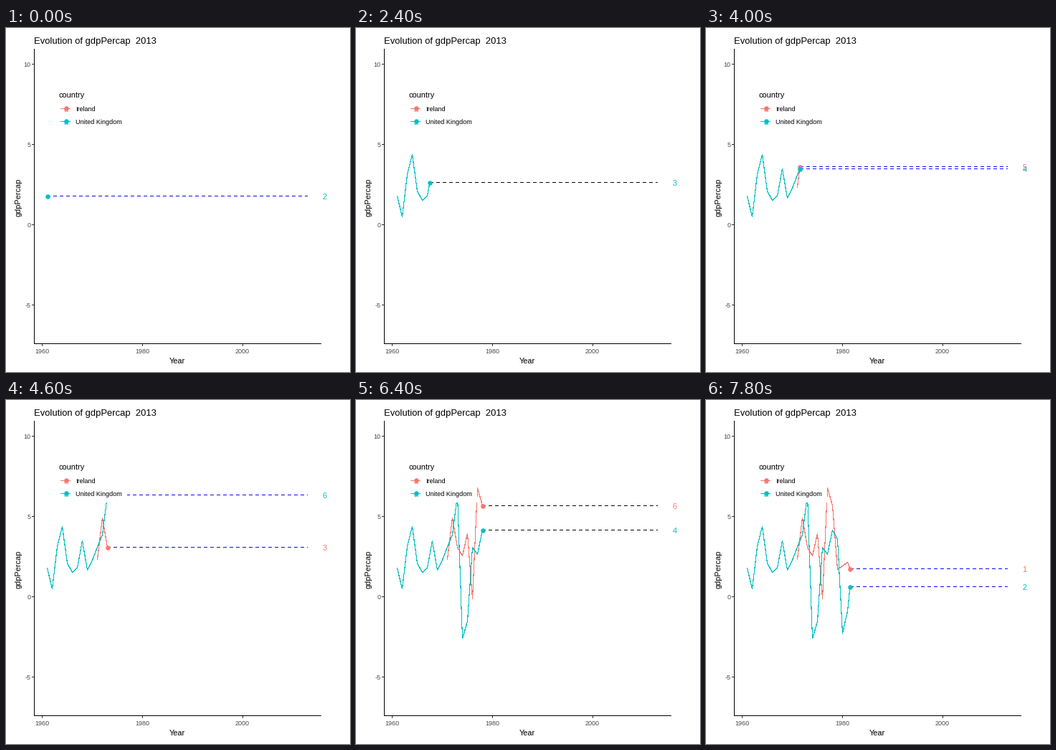
Animation of 480 by 480 pixels, one loop 8000 ms. Source, as a matplotlib script:

```python
import numpy as np
import matplotlib.pyplot as plt
from matplotlib.animation import FuncAnimation
from matplotlib.patches import Rectangle

plt.rcParams.update({
    "font.family": "Liberation Sans",
    "toolbar": "None",
    "path.snap": False,
    "lines.scale_dashes": False,
})

PX = 0.9  # points per pixel at 80 dpi
HAIR = 0.1 * PX  # without antialiasing a hairline fills one pixel
FRAMES, TOTAL, SPAN = 40, 100, 52
START = 1961

GROWTH = {
    "Ireland": (1971, "#F8766D", [
        2.32, 4.93, 3.08, 2.54, 3.93, -0.13, 6.79, 5.67, 1.70, 1.92, 2.14, 1.34]),
    "United Kingdom": (1961, "#00BFC4", [
        1.79, 0.49, 3.12, 4.38, 2.10, 1.52, 1.79, 3.48, 1.66, 2.28, 3.10,
        3.85, 6.34, -2.60, -1.54, 3.06, 2.65, 4.16, 3.57, -2.28, -0.90, 2.14]),
}

# every year lands on a whole frame, with straight motion in between
YEAR_FRAMES = np.round(np.arange(SPAN + 1) * (TOTAL - 1) / SPAN)


def px(year):
    return 50.5 + 7 * (np.asarray(year) - 1960)


def py(value):
    return 274.5 - 22.4 * np.asarray(value)


fig = plt.figure(figsize=(6, 6), dpi=80, facecolor="white")
ax = fig.add_axes([0, 0, 1, 1])
ax.set(xlim=(0, 480), ylim=(480, 0))
ax.axis("off")


def write(x, y, s, size, color="black", **kw):
    kw.setdefault("va", "baseline")
    return ax.text(x, y, s, fontsize=size * PX, color=color, **kw)


def stroke(xs, ys, color="black", z=2, **kw):
    return ax.plot(xs, ys, color=color, lw=HAIR, zorder=z, antialiased=False,
                   snap=False, solid_capstyle="butt", dash_capstyle="butt",
                   **kw)[0]


def dot(x, y, color, z):
    return ax.plot([x], [y], "o", ms=6.5 * PX, mew=0, color=color, zorder=z,
                   antialiased=False, snap=False)[0]


def draw_axes():
    stroke([39.5, 39.5], [29, 441])
    stroke([39, 440], [440.5, 440.5])
    for v in (10, 5, 0, -5):
        stroke([36, 39], [py(v)] * 2, "#333333")
        write(34.5, py(v) + 4, str(v), 9, "#4D4D4D", ha="right")
    for year in (1960, 1980, 2000):
        stroke([px(year)] * 2, [441, 444], "#333333")
        write(px(year) - 0.5, 454, str(year), 9, "#4D4D4D", ha="center")
    write(39, 22, "Evolution of gdpPercap  2013", 13)
    write(239, 468, "Year", 11, ha="center")
    write(17.5, 236, "gdpPercap", 11, ha="center", va="center", rotation=90)


def draw_legend():
    ax.add_patch(Rectangle((69, 82), 100, 61, fc="white", ec="none", zorder=10))
    write(74, 97, "country", 11, zorder=11)
    for i, (name, (_, color, _)) in enumerate(GROWTH.items()):
        y = 112.5 + 18 * i
        stroke([76, 90], [y, y], color, 11)
        dot(83.5, y - 0.5, color, 12)
        write(83.3, y + 4.5, "a", 11, color, ha="center", zorder=13)
        write(97, y + 3.5, name, 9, zorder=11)


class Series:
    def __init__(self, first, color, values):
        self.years = first + np.arange(len(values))
        self.values = np.array(values)
        self.line = stroke([], [], color, 3)
        self.guide = stroke([], [], "blue", 4, linestyle=(0, (4 * PX, 4 * PX)))
        self.dot = dot(0, 0, color, 5)
        self.label = write(441.5, 0, "", 11, color, zorder=6)
        self.parts = [self.line, self.guide, self.dot, self.label]

    def update(self, year, guide_color):
        shown = year >= self.years[0]
        for part in self.parts:
            part.set_visible(shown)
        if not shown:
            return
        now = np.interp(year, self.years, self.values)
        past = self.years < year
        x, y = float(px(year)), float(py(now))
        self.line.set_data(np.append(px(self.years[past]), x),
                           np.append(py(self.values[past]), y))
        self.guide.set_data([int(x), 421], [int(y) + 0.5] * 2)
        self.guide.set_color(guide_color)
        self.dot.set_data([x], [int(y) + 0.5])
        # the label already shows the year being approached
        target = self.values[int(np.ceil(year)) - self.years[0]]
        self.label.set_text(str(int(round(target))))
        self.label.set_y(int(y) + 5)


draw_axes()
draw_legend()
series = [Series(*spec) for spec in GROWTH.values()]


def update(frame):
    year = START + np.interp(frame, YEAR_FRAMES, np.arange(SPAN + 1))
    dark = 9 <= frame < 20 or 28 <= frame < 36
    for s in series:
        s.update(year, "black" if dark else "blue")
    return [p for s in series for p in s.parts]


anim = FuncAnimation(fig, update, frames=FRAMES, interval=200, repeat=True,
                     repeat_delay=0, blit=False)
plt.show()
```
